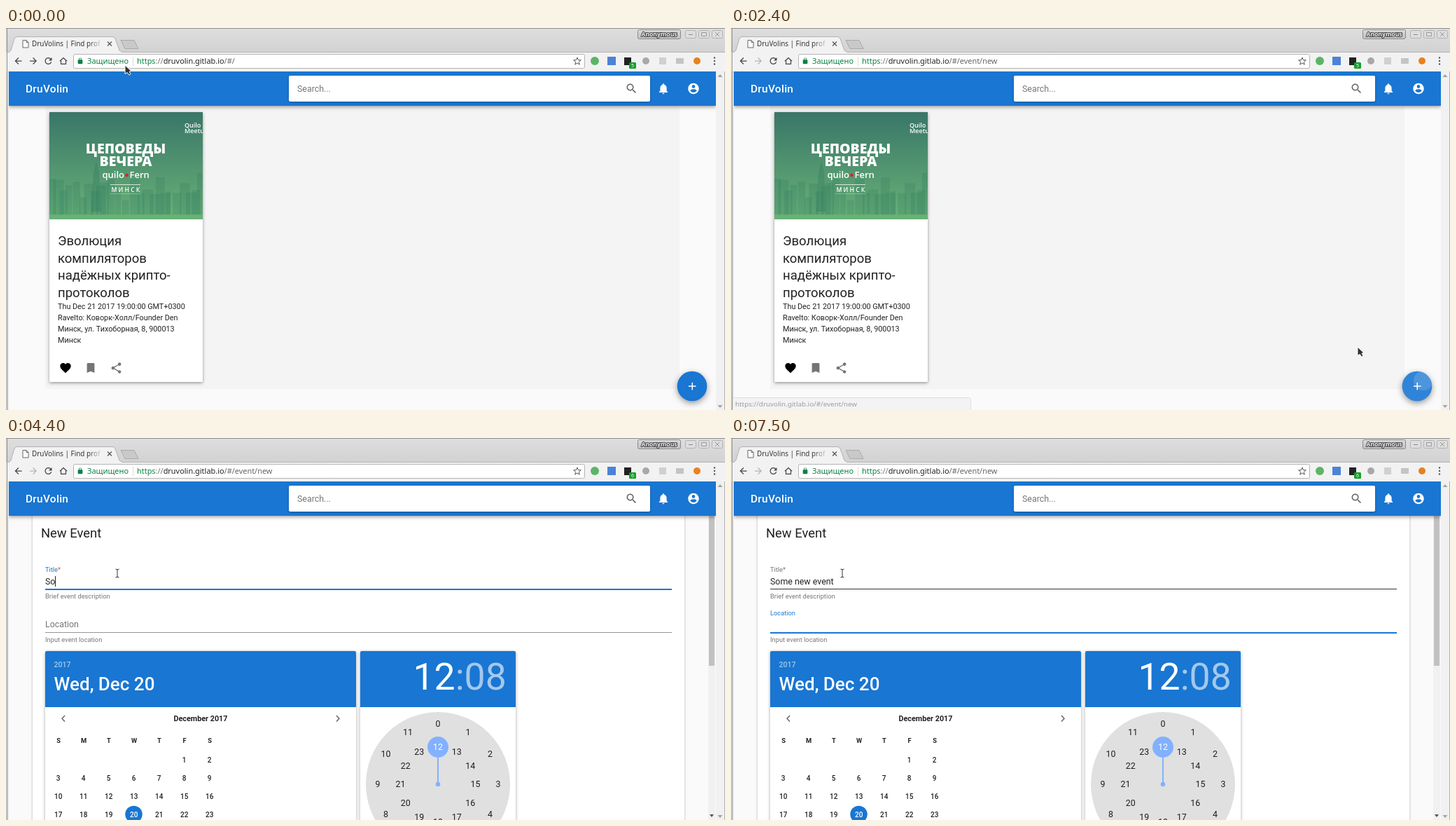
An HTML page with a canvas for the animation above (8000 ms loop, 1027 by 545 pixels).

```html
<!DOCTYPE html>
<html lang="ru">
<head>
<meta charset="utf-8">
<title>New event demo</title>
<style>
html, body { margin: 0; width: 100%; height: 100%; overflow: hidden; background: #fafafa; }
canvas { display: block; }
</style>
</head>
<body>
<canvas id="stage" width="1027" height="545"></canvas>
<script>
const c = document.getElementById('stage').getContext('2d');
const LOOP = 8000, STEP = 100;
const BLUE = '#1976d2', INK = 'rgba(0,0,0,.87)', SOFT = 'rgba(0,0,0,.54)';
const UI = '"Noto Sans", sans-serif', APP = 'Roboto, sans-serif';
const SITE = 'druvolin.gitlab.io';

const ICON = {
  heart: 'M12 21.35l-1.45-1.32C5.4 15.36 2 12.28 2 8.5 2 5.42 4.42 3 7.5 3c1.74 0 3.41.81 4.5 2.09C13.09 3.81 14.76 3 16.5 3 19.58 3 22 5.42 22 8.5c0 3.78-3.4 6.86-8.55 11.54L12 21.35z',
  bookmark: 'M17 3H7c-1.1 0-2 .9-2 2v16l7-3 7 3V5c0-1.1-.9-2-2-2z',
  share: 'M18 16.08c-.76 0-1.44.3-1.96.77L8.91 12.7c.05-.23.09-.46.09-.7s-.04-.47-.09-.7l7.05-4.11c.54.5 1.25.81 2.04.81 1.66 0 3-1.34 3-3s-1.34-3-3-3-3 1.34-3 3c0 .24.04.47.09.7L8.04 9.81C7.5 9.31 6.79 9 6 9c-1.66 0-3 1.34-3 3s1.34 3 3 3c.79 0 1.5-.31 2.04-.81l7.12 4.16c-.05.21-.08.43-.08.65 0 1.61 1.31 2.92 2.92 2.92s2.92-1.31 2.92-2.92-1.31-2.92-2.92-2.92z',
  search: 'M15.5 14h-.79l-.28-.27C15.41 12.59 16 11.11 16 9.5 16 5.91 13.09 3 9.5 3S3 5.91 3 9.5 5.91 16 9.5 16c1.61 0 3.09-.59 4.23-1.57l.27.28v.79l5 4.99L20.49 19l-4.99-5zm-6 0C7.01 14 5 11.99 5 9.5S7.01 5 9.5 5 14 7.01 14 9.5 11.99 14 9.5 14z',
  bell: 'M12 22c1.1 0 2-.9 2-2h-4c0 1.1.89 2 2 2zm6-6v-5c0-3.07-1.64-5.64-4.5-6.32V4c0-.83-.67-1.5-1.5-1.5s-1.5.67-1.5 1.5v.68C7.63 5.36 6 7.92 6 11v5l-2 2v1h16v-1l-2-2z',
  account: 'M12 2C6.48 2 2 6.48 2 12s4.48 10 10 10 10-4.48 10-10S17.52 2 12 2zm0 3c1.66 0 3 1.34 3 3s-1.34 3-3 3-3-1.34-3-3 1.34-3 3-3zm0 14.2c-2.5 0-4.71-1.28-6-3.22.03-1.99 4-3.08 6-3.08 1.99 0 5.97 1.09 6 3.08-1.29 1.94-3.5 3.22-6 3.22z',
  back: 'M20 11H7.83l5.59-5.59L12 4l-8 8 8 8 1.41-1.41L7.83 13H20v-2z',
  forward: 'M4 11h12.17l-5.59-5.59L12 4l8 8-8 8-1.41-1.41L16.17 13H4v-2z',
  reload: 'M17.65 6.35C16.2 4.9 14.21 4 12 4c-4.42 0-7.99 3.58-7.99 8s3.57 8 7.99 8c3.73 0 6.84-2.55 7.73-6h-2.08c-.82 2.33-3.04 4-5.65 4-3.31 0-6-2.69-6-6s2.69-6 6-6c1.66 0 3.14.69 4.22 1.78L13 11h7V4l-2.35 2.35z',
  home: 'M12 3.2L1.8 12.5H5V20.5h14V12.5h3.2zM12 5.9l5 4.6v8H7v-8z',
  lock: 'M18 8h-1V6c0-2.76-2.24-5-5-5S7 3.24 7 6v2H6c-1.1 0-2 .9-2 2v10c0 1.1.9 2 2 2h12c1.1 0 2-.9 2-2V10c0-1.1-.9-2-2-2zM15.1 8H8.9V6a3.1 3.1 0 0 1 6.2 0z'
};
for (const k in ICON) ICON[k] = new Path2D(ICON[k]);

function icon(name, x, y, size, color) {
  c.save();
  c.translate(x - size / 2, y - size / 2);
  c.scale(size / 24, size / 24);
  c.fillStyle = color;
  c.fill(ICON[name], 'evenodd');
  c.restore();
}
function rect(x, y, w, h, color) { c.fillStyle = color; c.fillRect(x, y, w, h); }
function round(x, y, w, h, r, color) {
  c.beginPath(); c.roundRect(x, y, w, h, r);
  c.fillStyle = color; c.fill();
}
function dot(x, y, r, color) {
  c.beginPath(); c.arc(x, y, r, 0, 7);
  c.fillStyle = color; c.fill();
}
function poly(pts, fill, stroke, width = 1, open) {
  c.beginPath();
  pts.forEach(([x, y]) => c.lineTo(x, y));
  if (!open) c.closePath();
  if (fill) { c.fillStyle = fill; c.fill(); }
  if (stroke) { c.strokeStyle = stroke; c.lineWidth = width; c.stroke(); }
}
// Returns the x where the text ends.
function text(s, x, y, size, color, font = APP, weight = 400, align = 'left') {
  c.font = `${weight} ${size}px ${font}`;
  c.textAlign = align;
  c.fillStyle = color;
  c.fillText(s, x, y);
  return x + c.measureText(s).width;
}
function shadowed(draw, blur, dy, alpha) {
  c.save();
  c.shadowColor = `rgba(0,0,0,${alpha})`;
  c.shadowBlur = blur;
  c.shadowOffsetY = dy;
  draw();
  c.restore();
}
function vertical(y0, y1, a, b) {
  const g = c.createLinearGradient(0, y0, 0, y1);
  g.addColorStop(0, a); g.addColorStop(1, b);
  return g;
}
const clamp = v => Math.max(0, Math.min(1, v));
const easeOut = u => 1 - (1 - clamp(u)) ** 3;
const smooth = u => (u = clamp(u), u * u * (3 - 2 * u));

const PATH = [
  [0, 170, 53], [100, 172, 74], [200, 172, 74], [500, 188, 155], [800, 214, 240],
  [900, 214, 240], [1300, 217, 256], [1400, 300, 290], [1500, 480, 350],
  [1600, 690, 430], [1700, 860, 485], [1800, 948, 512], [2000, 985, 503],
  [2200, 985, 503], [2300, 970, 495], [2400, 895, 455], [2500, 700, 386],
  [2600, 470, 310], [2700, 300, 245], [2800, 195, 205], [2900, 159, 193]
];
function pointer(t) {
  const i = PATH.findIndex(p => p[0] > t);
  if (i < 0) return PATH[PATH.length - 1].slice(1);
  const [ta, xa, ya] = PATH[i - 1], [tb, xb, yb] = PATH[i];
  const u = (t - ta) / (tb - ta);
  return [xa + (xb - xa) * u, ya + (yb - ya) * u];
}

const KEYS = [[4300, 1], [4400, 2], [4600, 4], [4800, 5], [5400, 6], [5500, 7],
  [5600, 9], [5900, 10], [6200, 11], [6300, 12], [6400, 14]];
function typed(t) {
  const k = KEYS.filter(k => k[0] <= t).pop();
  return 'Some new event'.slice(0, k ? k[1] : 0);
}

function browser(t) {
  rect(0, 0, 1027, 62, vertical(0, 34, '#dedede', '#d2d2d2'));
  rect(0, 34, 1027, 28, '#f2f2f2');
  rect(0, 0, 1027, 1, '#8e8e8e');
  poly([[4, 34.5], [7, 32], [12, 15], [15, 12.5], [153, 12.5], [156, 15], [162, 32], [165, 34.5]], '#f2f2f2', '#b2b2b2');
  rect(2, 34, 3, 1, '#b4b4b4');
  rect(165, 34, 862, 1, '#b4b4b4');
  rect(5, 34, 160, 2, '#f2f2f2');
  poly([[164, 17.5], [183, 17.5], [189, 29.5], [170, 29.5]], '#c9c9c9', '#aaa');
  poly([[24, 17.5], [29, 17.5], [32, 20.5], [32, 28], [24, 28]], '#fff', '#666');
  poly([[29, 17.5], [29, 20.5], [32, 20.5]], null, '#666', 1, true);
  const fade = c.createLinearGradient(118, 0, 138, 0);
  fade.addColorStop(0, '#333'); fade.addColorStop(1, 'rgba(51,51,51,0)');
  c.save();
  c.beginPath(); c.rect(36, 13, 102, 20); c.clip();
  text('DruVolins | Find prof', 37, 26, 9.9, fade, UI);
  c.restore();
  poly([[145, 19.5], [151, 25.5]], null, '#555', 1.2, true);
  poly([[151, 19.5], [145, 25.5]], null, '#555', 1.2, true);

  c.beginPath(); c.roundRect(902.5, 2.5, 61, 13, 2);
  c.fillStyle = vertical(2, 16, '#dcdcdc', '#bfbfbf'); c.fill();
  c.strokeStyle = '#8b8b8b'; c.lineWidth = 1; c.stroke();
  c.font = `700 8.6px ${UI}`; c.textAlign = 'center';
  c.strokeStyle = '#444'; c.lineWidth = 2; c.lineJoin = 'round';
  c.strokeText('Anonymous', 933, 12.3);
  text('Anonymous', 933, 12.3, 8.6, '#eee', UI, 700, 'center');
  for (const x of [970, 989, 1008]) {
    c.beginPath(); c.roundRect(x + .5, 3.5, 15, 11, 2);
    c.fillStyle = '#dedede'; c.fill();
    c.strokeStyle = '#b2b2b2'; c.lineWidth = 1; c.stroke();
  }
  rect(975, 9, 6, 1, '#888');
  c.strokeStyle = '#999'; c.strokeRect(993.5, 6.5, 7, 5);
  poly([[1013, 6], [1019, 12]], null, '#999', 1, true);
  poly([[1019, 6], [1013, 12]], null, '#999', 1, true);

  icon('back', 17.5, 47, 15, '#444');
  icon('forward', 39, 47, 15, t < 2300 ? '#444' : '#b4b4b4');
  icon('reload', 60.5, 47, 15, '#444');
  icon('home', 82, 47, 14, '#444');
  c.beginPath(); c.roundRect(96.5, 37.5, 730, 20, 2);
  c.fillStyle = '#fff'; c.fill();
  c.strokeStyle = '#b4b4b4'; c.lineWidth = 1; c.stroke();
  icon('lock', 106, 47, 10, '#0b8043');
  text('Защищено', 116, 51, 10.93, '#0b8043', UI);
  rect(181, 41, 1, 13, '#ddd');
  let x = text('https', 187, 51, 10.93, '#0b8043', UI);
  x = text('://', x, 51, 10.93, '#777', UI);
  x = text(SITE, x, 51, 10.93, '#222', UI);
  text(t < 2300 ? '/#/' : '/#/event/new', x, 51, 10.93, '#666', UI);
  const star = [];
  for (let i = 0; i < 10; i++) {
    const a = -Math.PI / 2 + i * Math.PI / 5, r = i % 2 ? 2.4 : 5.6;
    star.push([816 + r * Math.cos(a), 47.6 + r * Math.sin(a)]);
  }
  poly(star, null, '#555', 1);

  dot(841, 47, 6, '#5cb567');
  rect(859, 41, 12, 12, '#4c83d8');
  rect(883, 42, 10, 11, '#222');
  round(890, 49, 10, 9, 1.5, '#12a12a');
  text(t < 2500 ? '5' : '6', 895, 56.3, 7, '#fff', UI, 400, 'center');
  dot(914, 47, 5, '#a8a8a8');
  rect(933, 42, 10, 10, '#d0d0d0');
  rect(957, 43, 11, 8, '#c4c4c4');
  dot(987, 47, 5, '#e8811f');
  for (const y of [42.5, 47, 51.5]) dot(1012, y, 1.2, '#555');
}

function bar() {
  shadowed(() => rect(4, 62, 1010, 49, BLUE), 5, 2, .35);
  c.letterSpacing = '.3px';
  text('DruVolin', 28, 92, 15.4, '#fff', APP, 500);
  c.letterSpacing = '0px';
  shadowed(() => round(404, 68, 516, 37, 2, '#fff'), 3, 1, .3);
  text('Search...', 416, 91, 12.4, SOFT);
  icon('search', 893.5, 86.5, 18.5, '#666');
  icon('bell', 939, 86.5, 18.5, '#fff');
  icon('account', 982, 86.5, 18.5, '#fff');
  rect(1014, 62, 12, 483, '#f1f1f1');
  poly([[1016.5, 70], [1020, 66], [1023.5, 70]], '#a3a3a3');
  poly([[1016.5, 538], [1020, 542], [1023.5, 538]], '#a3a3a3');
}

function poster() {
  c.save();
  c.beginPath(); c.rect(62, 120, 219, 153); c.clip();
  rect(62, 120, 219, 153, vertical(120, 273, '#397668', '#69b277'));
  let seed = 11;
  const rnd = () => (seed = seed * 16807 % 2147483647) / 2147483647;
  for (let x = 60; x < 285; x += 6 + rnd() * 6) {
    const top = (x > 185 ? 205 : 215) + rnd() * 32;
    rect(x, top, 7 + rnd() * 9, 266 - top, 'rgba(38,112,92,.2)');
  }
  poly([[122, 262], [125, 206], [129, 190], [133, 206], [136, 262]], 'rgba(38,112,92,.28)');
  const T = '"Open Sans", sans-serif';
  text('Quilo', 255, 142, 9, '#fff', T, 600);
  text('Meetup', 255, 149.5, 9, '#fff', T, 600);
  text('ЦЕПОВЕДЫ', 171, 178.5, 19.5, '#fff', T, 800, 'center');
  text('ВЕЧЕРА', 171, 197, 19.5, '#fff', T, 800, 'center');
  text('quilo', 169, 214, 13, '#fff', T, 600, 'right');
  dot(172.5, 210, 2.3, '#e02020');
  text('Fern', 176.5, 214, 13, '#fff', T, 600);
  rect(149, 223, 43, 1, 'rgba(255,255,255,.75)');
  c.letterSpacing = '2.2px';
  text('МИНСК', 172, 234, 8.6, '#fff', T, 600, 'center');
  c.letterSpacing = '0px';
  rect(149, 236, 43, 1, 'rgba(255,255,255,.3)');
  c.restore();
}

function feed(t) {
  rect(4, 62, 1010, 483, '#fafafa');
  rect(56, 111, 906, 404, '#f4f4f4');
  shadowed(() => round(62, 120, 219, 385, 1, '#fff'), 4, 1.5, .4);
  poster();
  ['Эволюция', 'компиляторов', 'надёжных крипто-', 'протоколов']
    .forEach((s, i) => text(s, 74, 310 + i * 24.5, 18.5, INK));
  ['Thu Dec 21 2017 19:00:00 GMT+0300', 'Ravelto: Коворк-Холл/Founder Den',
    'Минск, ул. Тихоборная, 8, 900013', 'Минск']
    .forEach((s, i) => text(s, 74, 400.7 + i * 16.1, 10.8, INK));
  icon('heart', 85, 485, 18.5, '#000');
  icon('bookmark', 121, 485, 18.5, '#757575');
  icon('share', 157.5, 485, 18.5, '#757575');

  shadowed(() => dot(980, 511, 21.3, BLUE), 8, 3, .4);
  if (t >= 1900) dot(980, 511, 21.3, 'rgba(255,255,255,.1)');
  if (t >= 2200) {
    c.save();
    c.beginPath(); c.arc(980, 511, 21.3, 0, 7); c.clip();
    dot(989, 503, 5 + (t - 2200) * .045, 'rgba(255,255,255,.14)');
    c.restore();
  }
  rect(975, 510.3, 10.6, 1.5, '#fff');
  rect(979.5, 505.8, 1.5, 10.6, '#fff');
}

// y is the underline; float and line run from 0 to 1.
function field(name, hint, y, f) {
  const size = 12.4 - 3.1 * f.float, base = y - 8 - 17.5 * f.float;
  const star = name.endsWith('*'), label = star ? name.slice(0, -1) : name;
  const end = text(label, 56, base, size, f.focus ? BLUE : '#757575');
  if (star) text('*', end, base, size, f.focus ? '#f44336' : '#757575');
  rect(56, y - 1, 895, 1, f.dark ? 'rgba(0,0,0,.8)' : 'rgba(0,0,0,.42)');
  if (f.line > 0) rect(503.5 - 447.5 * f.line, y - 1, 895 * f.line, 2, BLUE);
  text(hint, 56, y + 12.6, 9.3, '#757575');
  let end2 = 56.5;
  if (f.value) end2 = text(f.value, 56, y - 7.5, 12.4, INK);
  if (f.caret) rect(Math.round(end2 - .5), y - 19, 1, 15, f.value ? '#222' : BLUE);
}

function datePicker() {
  shadowed(() => round(56, 304, 444, 280, 2, '#fff'), 4, 1, .35);
  round(56, 304, 444, 80, [2, 2, 0, 0], BLUE);
  text('2017', 68.5, 327, 10.6, 'rgba(255,255,255,.6)', APP, 500);
  text('Wed, Dec 20', 68.5, 360.3, 26, '#fff', APP, 500);
  poly([[84, 396], [80, 400.3], [84, 404.6]], null, '#666', 1.5, true);
  poly([[472, 396], [476, 400.3], [472, 404.6]], null, '#666', 1.5, true);
  text('December 2017', 278, 404.2, 10.8, INK, APP, 700, 'center');
  [...'SMTWTFS'].forEach((s, i) => text(s, 75 + 36 * i, 435, 9.3, INK, APP, 700, 'center'));
  dot(182.5, 537, 12.3, BLUE);
  for (let d = 1; d <= 23; d++) {
    const n = d + 4;
    text(d, 74.7 + n % 7 * 36, 462.7 + Math.floor(n / 7) * 26, 10, d === 20 ? '#fff' : INK, APP, 500, 'center');
  }
}

function timePicker() {
  shadowed(() => round(506, 304, 222, 280, 2, '#fff'), 4, 1, .35);
  round(506, 304, 222, 80, [2, 2, 0, 0], BLUE);
  const x = text('12', 581.5, 359, 53.5, '#fff');
  text(':08', x, 359, 53.5, 'rgba(255,255,255,.6)');
  dot(617, 494, 103, '#e0e0e0');
  rect(616, 441, 2, 53, '#82b1ff');
  dot(617, 494, 3.3, '#82b1ff');
  dot(617, 441, 15, '#82b1ff');
  for (let h = 0; h < 24; h++) {
    const a = h * Math.PI / 6, r = h < 12 ? 86 : 53.5;
    text(h, 617 + r * Math.sin(a), 498.3 - r * Math.cos(a), 12.4, h === 12 ? '#fff' : INK, APP, 400, 'center');
  }
}

function form(t) {
  rect(4, 62, 1010, 483, '#fafafa');
  shadowed(() => rect(38, 100, 931, 460, '#fff'), 3, 1, .3);
  text('New Event', 50, 141.6, 18.4, INK);
  const inTitle = t >= 3200 && t < 6900, inPlace = t >= 6900;
  field('Title*', 'Brief event description', 216, {
    float: easeOut((t - 3200) / 450),
    line: smooth((t - 3200) / 380) * (1 - smooth((t - 6820) / 380)),
    focus: inTitle, dark: t >= 2800, value: typed(t),
    caret: inTitle && !(t >= 3900 && t < 4300)
  });
  field('Location', 'Input event location', 278.5 - .5, {
    float: easeOut((t - 6820) / 450),
    line: smooth((t - 6820) / 380),
    focus: inPlace, dark: t === 2700, value: '',
    caret: inPlace && t < 7500
  });
  datePicker();
  timePicker();
  rect(1003, 62, 10, 483, '#f1f1f1');
  rect(1004, 72, 8, 253, '#c1c1c1');
  poly([[1005, 537], [1008, 541], [1011, 537]], '#555');
}

function status(t) {
  const onCard = t < 1700;
  const alpha = onCard
    ? clamp((t - 500) / 300) * clamp((1600 - t) / 200)
    : t < 2400 ? clamp((t - 1800) / 200) : [.75, .25, .08][(t - 2400) / 100] || 0;
  if (!alpha) return;
  c.save();
  c.globalAlpha = alpha;
  c.beginPath(); c.roundRect(2.5, 527.5, 340, 20, [0, 3, 0, 0]);
  c.fillStyle = '#f0f0f0'; c.fill();
  c.strokeStyle = '#d6d6d6'; c.lineWidth = 1; c.stroke();
  const path = onCard ? 'pavel7orbi/20171220t085301896z' : 'new';
  text(`https://${SITE}/#/event/${path}`, 6, 540, 9.83, '#808080', UI);
  c.restore();
}

function cursor(t) {
  const [x, y] = pointer(t);
  c.save();
  c.translate(x, y);
  if (t < 2700) {
    c.lineJoin = 'round';
    poly([[0, 0], [0, 12.5], [3.2, 10.4], [5.8, 14.2], [8, 12.8], [6, 9.2], [9, 8.6]], '#333', '#fff', 1);
  } else {
    for (const [w, color] of [[2.4, 'rgba(255,255,255,.8)'], [1, '#333']]) {
      poly([[0, -5.5], [0, 5.5]], null, color, w, true);
      poly([[-2.5, -6], [0, -5.2], [2.5, -6]], null, color, w, true);
      poly([[-2.5, 6], [0, 5.2], [2.5, 6]], null, color, w, true);
    }
  }
  c.restore();
}

function draw(t) {
  c.clearRect(0, 0, 1027, 545);
  if (t < 2500) feed(t); else form(t);
  bar();
  browser(t);
  rect(0, 62, 4, 483, '#e2e2e2');
  rect(1026, 62, 1, 483, '#b0b0b0');
  rect(1, 0, 1, 545, '#8e8e8e');
  status(t);
  cursor(t);
}

const start = performance.now();
function tick() {
  const t = (performance.now() - start) % LOOP;
  draw(Math.floor(t / STEP) * STEP);
  requestAnimationFrame(tick);
}
tick();
</script>
</body>
</html>
```
